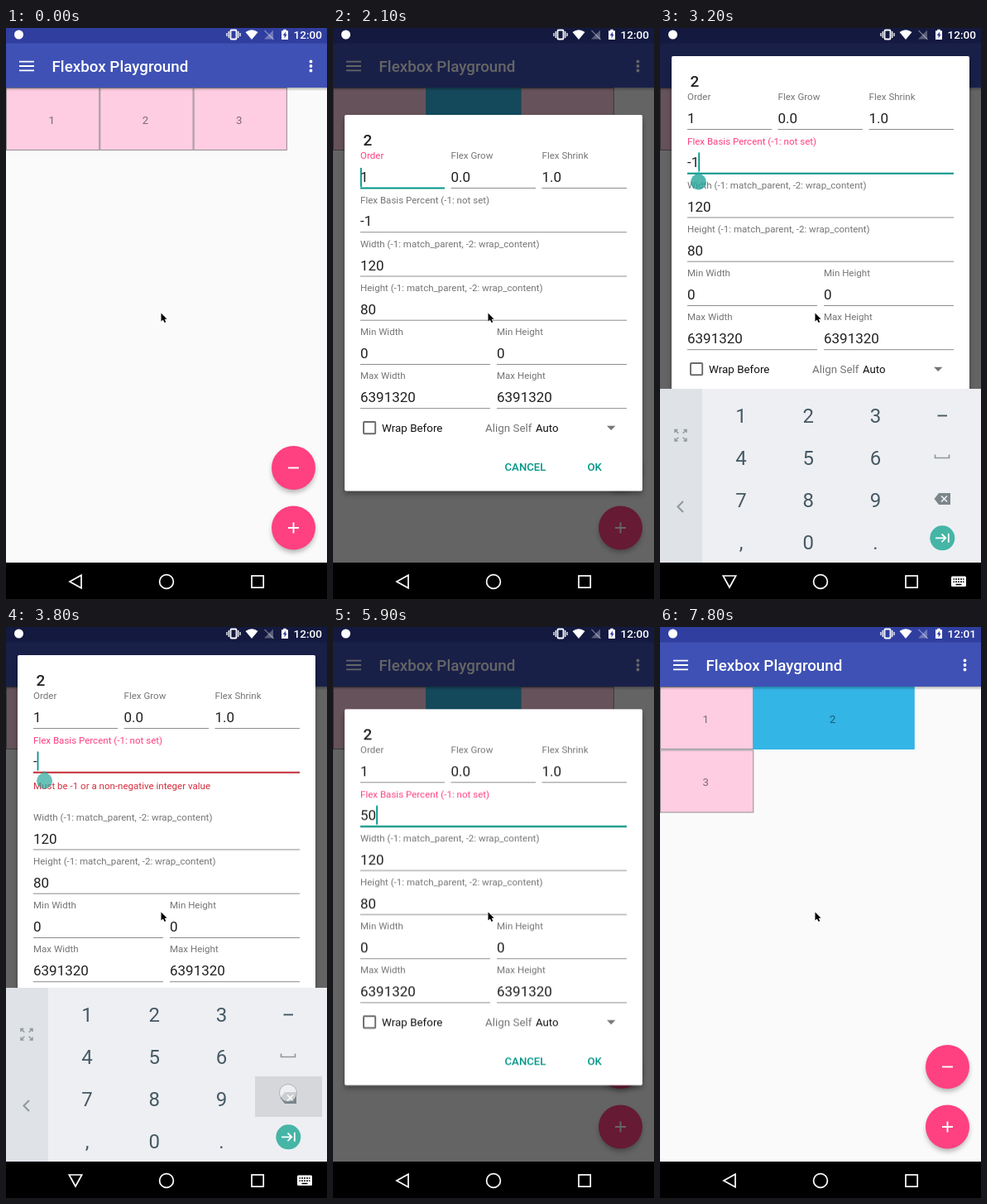
An HTML page for the animation above (8000 ms loop, 388 by 690 pixels).

```html
<!DOCTYPE html>
<html lang="en">
<head>
<meta charset="utf-8">
<title>Flexbox Playground</title>
<style>
html, body { margin: 0; width: 100%; height: 100%; overflow: hidden; background: #fafafa; }
svg { display: block; width: 388px; height: 690px; }
text { font-family: Roboto, sans-serif; white-space: pre; }
</style>
</head>
<body>
<svg id="stage" viewBox="0 0 388 690" xmlns="http://www.w3.org/2000/svg">
  <defs>
    <filter id="soft" x="-30%" y="-30%" width="160%" height="160%"><feGaussianBlur stdDeviation="3"/></filter>
    <linearGradient id="fall" x2="0" y2="1">
      <stop stop-opacity=".28"/><stop offset="1" stop-opacity="0"/>
    </linearGradient>
  </defs>
</svg>
<script>
const LOOP = 8000, TEAL = '#009688', PINK = '#ff4081', GREY = '#757575', INK = '#212121';
const stage = document.getElementById('stage');

function add(parent, tag, attrs = {}, text) {
  const node = document.createElementNS('http://www.w3.org/2000/svg', tag);
  for (const key in attrs) node.setAttribute(key, attrs[key]);
  if (text !== undefined) node.textContent = text;
  parent.append(node);
  return node;
}
const group = (parent, attrs) => add(parent, 'g', attrs);
const rect = (parent, x, y, width, height, fill, more) =>
  add(parent, 'rect', { x, y, width, height, fill, ...more });
const circle = (parent, cx, cy, r, fill, more) => add(parent, 'circle', { cx, cy, r, fill, ...more });
const path = (parent, d, fill, more) => add(parent, 'path', { d, fill, ...more });
const line = (parent, d, stroke, width) => path(parent, d, 'none', { stroke, 'stroke-width': width });
const label = (parent, x, y, text, size, fill, more) =>
  add(parent, 'text', { x, y, 'font-size': size, fill, ...more }, text);
const BOLD = { 'font-weight': 500 }, MID = { 'text-anchor': 'middle' };

// Steps are [ms, value]; the first and last values fill the rest of the loop.
function track(node, prop, steps, easing = 'linear') {
  const all = [...steps];
  if (all[0][0] > 0) all.unshift([0, all[0][1]]);
  if (all.at(-1)[0] < LOOP) all.push([LOOP, all.at(-1)[1]]);
  node.animate(all.map(([ms, value]) => ({ offset: ms / LOOP, [prop]: value, easing })),
    { duration: LOOP, iterations: Infinity });
  return node;
}
const fade = (node, ...steps) => track(node, 'opacity', steps);
const slide = (node, ...steps) =>
  track(node, 'transform', steps.map(([ms, y]) => [ms, `translateY(${y}px)`]));
const hold = (node, prop, ...steps) => track(node, prop, steps, 'steps(1, end)');

// Visible only inside the given [from, to] spans.
function show(node, ...spans) {
  const steps = spans.flatMap(([from, to]) => [[from, 1], [to, 0]]);
  if (steps[0][0] > 0) steps.unshift([0, 0]);
  return hold(node, 'opacity', ...steps);
}

// Page
rect(stage, 0, 0, 388, 690, '#fafafa');
const page = group(stage);

function item(parent, n, x, y, w, blue) {
  const g = group(parent);
  if (blue) rect(g, x - 1, y, w + 1.5, 76, '#33b5e5');
  else rect(g, x + .5, y + .5, w - 1, 75, '#ffcde1', { stroke: '#929092' });
  label(g, x + w / 2 - 1.5, y + 43.5, n, 13.2, 'rgba(0,0,0,.5)', MID);
  return g;
}
const W = 113.3, RELAYOUT = 6560;
item(page, 1, 0, 72, W);
show(item(page, 3, 2 * W, 72, W), [0, RELAYOUT]);
show(item(page, 2, W, 72, W), [0, 960]);
show(item(page, 2, W, 72, W, true), [960, RELAYOUT]);
show(item(page, 2, W, 72, 194, true), [RELAYOUT, LOOP]);
show(item(page, 3, 0, 148.5, W), [RELAYOUT, LOOP]);

rect(page, 0, 0, 388, 72, '#3f51b5');
rect(page, 0, 0, 388, 18.5, '#303f9f');
rect(page, 0, 72, 388, 4, 'url(#fall)');
line(page, 'M16 40.6H34M16 46H34M16 51.4H34', '#fff', 1.9);
label(page, 55.5, 53, 'Flexbox Playground', 18.8, '#fff', BOLD);
for (const y of [40.5, 46, 51.5]) circle(page, 368.5, y, 1.9, '#fff');

for (const [y, icon] of [[531.5, 'M341 531.5h13'], [604, 'M341 604h13M347.5 597.5v13']]) {
  circle(page, 347.5, y + 4, 25.5, '#000', { opacity: .3, filter: 'url(#soft)' });
  circle(page, 347.5, y, 26.5, PINK);
  line(page, icon, '#fff', 1.9);
}

const scrim = rect(stage, 0, 0, 388, 646, '#000');
fade(scrim, [1100, 0], [1200, .27], [1400, .6], [6500, .6], [6600, .47], [6700, .25], [6900, 0]);

// Status bar
const status = group(stage);
circle(status, 15.5, 8, 5.5, '#fff');
rect(status, 271.5, 2.5, 7, 11, 'none', { stroke: '#fff', 'stroke-width': 1.8, rx: 1 });
line(status, 'M269.3 4v8M280.7 4v8M267 6v4M283 6v4', '#fff', 1.3);
path(status, 'M289.5 5Q297 -.5 304.5 5L297 14Z', '#fff');
path(status, 'M323 2.5V13.5H312Z', '#fff', { opacity: .3 });
line(status, 'M312.5 3L323.5 14', 'rgba(255,255,255,.4)', 1.2);
path(status, 'M333 3.2h2.2v-1.5h3.6v1.5H341V14h-8Z', '#fff');
path(status, 'M338 4.6l-3.2 4.4h1.8v3.4l3-4.6h-1.6Z', '#303f9f');
const clock = { 'text-anchor': 'end', ...BOLD };
show(label(status, 382, 13, '12:00', 13.6, '#fff', clock), [0, 7200]);
show(label(status, 382, 13, '12:01', 13.6, '#fff', clock), [7200, LOOP]);

// Dialog
const dialog = group(stage);
fade(dialog, [1100, 0], [1200, .94], [1300, 1], [6500, 1], [6600, .42], [6700, .1], [6780, 0]);
const body = group(dialog);
slide(body, [2980, 0], [3060, -40], [3180, -71], [5700, -71], [5800, -36], [5920, 0]);
rect(body, 14, 110, 360, 453, '#000', { opacity: .35, filter: 'url(#soft)' });
rect(body, 14, 105, 360, 454.5, '#fff', { rx: 2 });
label(body, 36.5, 142, '2', 18.9, INK, BOLD);

const FOCUS = 2580, ERROR = [3620, 4520];
const lower = group(body);
hold(lower, 'transform', [0, 'translateY(0)'], [ERROR[0], 'translateY(40px)'], [ERROR[1], 'translateY(0)']);

function field(parent, x, right, y, name, value) {
  line(parent, `M${x} ${y + 35.3}H${right}`, '#8c8c8c', 1);
  if (value) label(parent, x, y + 28, value, 17, INK);
  return label(parent, x, y, name, 11.55, GREY);
}
const order = field(body, 33, 135, 158.2, 'Order', '1');
field(body, 142.5, 245, 158.2, 'Flex Grow', '0.0');
field(body, 252.5, 355, 158.2, 'Flex Shrink', '1.0');
const basis = field(body, 33, 355, 211.5, 'Flex Basis Percent (-1: not set)');
field(lower, 33, 355, 264.7, 'Width (-1: match_parent, -2: wrap_content)', '120');
field(lower, 33, 355, 317.9, 'Height (-1: match_parent, -2: wrap_content)', '80');
field(lower, 33, 190, 371.2, 'Min Width', '0');
field(lower, 198, 355, 371.2, 'Min Height', '0');
field(lower, 33, 190, 424.4, 'Max Width', '6391320');
field(lower, 198, 355, 424.4, 'Max Height', '6391320');

hold(order, 'fill', [0, PINK], [FOCUS, GREY]);
hold(basis, 'fill', [0, GREY], [FOCUS, PINK]);
show(line(body, 'M33 193.5H135', TEAL, 2), [0, FOCUS]);
show(line(body, 'M33 246.8H355', TEAL, 2), [FOCUS, ERROR[0]], [ERROR[1], LOOP]);
show(line(body, 'M33 246.8H355', '#c62f38', 2), ERROR);
fade(label(body, 33, 266.5, 'Must be -1 or a non-negative integer value', 11.55, '#d32f3f'),
  [ERROR[0], 0], [3760, 1], [ERROR[1] - 20, 1], [ERROR[1], 0]);

const typed = [['-1', 0, 3580], ['-', 3580, 3960], ['5', 4480, 4800], ['50', 4800, LOOP]];
for (const [text, from, to] of typed) show(label(body, 33, 239.3, text, 17, INK), [from, to]);

const caret = (x, y, ...spans) => show(rect(body, x, y, 1.8, 23, TEAL), ...spans);
caret(33, 169, [1150, 1600], [2100, FOCUS]);
caret(46.3, 221.5, [FOCUS, 3260], [3380, 3580]);
caret(37.6, 221.5, [3580, 3960]);
caret(33, 221.5, [3960, 4480]);
caret(42.5, 221.5, [4480, 4800]);
caret(52.2, 221.5, [4800, 5280], [5780, 6180]);

const handle = path(body, 'M46.5 245L53.5 250.5A9.5 9.5 0 1 1 39.5 250.5Z', '#26a69a');
fade(handle, [2680, 0], [2800, .8], [3580, .8], [3800, .7], [4000, 0]);

rect(lower, 37, 476, 14.2, 14.2, 'none', { stroke: '#6b6b6b', 'stroke-width': 1.9, rx: 1 });
label(lower, 59, 488, 'Wrap Before', 13.4, '#111');
label(lower, 184, 488, 'Align Self', 13.4, GREY);
label(lower, 245, 488, 'Auto', 13.2, '#111');
path(lower, 'M331 480.8h10.4l-5.2 5.2Z', '#757575');
label(lower, 207.5, 534.5, 'CANCEL', 13.2, TEAL, BOLD);
label(lower, 307.5, 534.5, 'OK', 13.2, TEAL, BOLD);

// Keyboard
rect(stage, 0, 646, 388, 44, '#000');
const board = group(stage), KEY = '#455a64', SOFT = '#90989c';
slide(board, [2800, 140], [2900, 67], [3000, 16], [3100, 0], [5600, 0], [5700, 50], [5820, 130]);
fade(board, [2820, 0], [2900, .53], [3000, .9], [3080, 1], [5600, 1], [5700, .6], [5800, 0]);
rect(board, 0, 436, 388, 210, '#eeeff3');
rect(board, 0, 436, 51, 210, '#dfe2e6');
show(rect(board, 301, 543, 81, 49, '#d6d7db'), [3480, 3580], [3740, 3960]);
show(rect(board, 139, 492, 81, 50, '#d6d7db'), [4400, 4560]);
[['1', '2', '3'], ['4', '5', '6'], ['7', '8', '9'], [',', '0', '.']].forEach((row, r) =>
  row.forEach((key, c) => label(board, 98 + c * 81.2, 476.5 + r * 51.2, key, 24, KEY, MID)));
line(board, 'M335.5 468.5h11.5', KEY, 1.9);
line(board, 'M332.5 515.5v4h17v-4', SOFT, 1.7);
path(board, 'M331.5 569l5.5-7h14v14h-14Z', '#7b868b');
line(board, 'M340 565.5l7 7M347 565.5l-7 7', '#eeeff3', 1.7);
circle(board, 341.3, 616.3, 15, '#45b5a6');
line(board, 'M333 616.3h12M340.5 611.5l4.8 4.8l-4.8 4.8M348.8 610.8v11', '#fff', 1.8);
line(board, 'M18 489v-3.5h3.5M18 485.5l4.3 4.3M28.5 485.5H32v3.5M32 485.5l-4.3 4.3'
  + 'M18 495.5v3.5h3.5M18 499l4.3-4.3M28.5 499H32v-3.5M32 499l-4.3-4.3', SOFT, 1.4);
line(board, 'M28 572l-6.5 6.5l6.5 6.5', SOFT, 2);

// Navigation bar, black again once the keyboard has settled
const shade = rect(stage, 0, 646, 388, 44, '#000');
fade(shade, [2800, 1], [2900, .32], [3100, 1]);
const nav = group(stage), KEYS = [2850, 5650];
show(line(nav, 'M77 669L91 661.3V676.7Z', '#fff', 1.7), [0, KEYS[0]], [KEYS[1], LOOP]);
const typing = show(group(nav), KEYS);
line(typing, 'M76.3 662H91.7L84 676Z', '#fff', 1.7);
rect(typing, 352, 662.5, 18, 12.5, '#fff', { rx: 1.5 });
line(typing, 'M354.5 666h13M354.5 669.2h13', '#000', 1.6);
for (let x = 356.5; x < 367; x += 3) line(typing, `M${x} 664.5v5.5`, '#fff', 1);
line(typing, 'M357.5 672.5h7', '#000', 1.5);
circle(nav, 194, 669, 8.4, 'none', { stroke: '#fff', 'stroke-width': 1.7 });
rect(nav, 297, 662, 14.2, 14.2, 'none', { stroke: '#fff', 'stroke-width': 1.7 });

// Taps
function tap(x, y, from, to) {
  const dot = circle(stage, x, y, 10.5, 'rgba(255,255,255,.6)', { stroke: 'rgba(110,110,130,.4)' });
  fade(dot, [from - 30, 0], [from, 1], [to - 80, 1], [to, 0]);
}
tap(170, 112, 800, 1060);
fade(circle(stage, 162.5, 227.5, 10.5, 'none', { stroke: '#c9c9c9' }),
  [2470, 0], [2500, 1], [2900, .7], [3000, 0]);
tap(341, 573, 3430, 3640);
tap(341, 563, 3730, 3980);
tap(180, 520, 4370, 4600);
tap(180, 603, 4700, 4950);
tap(84, 668, 5450, 5750);
tap(328, 523, 6480, 6740);

// Pointer
path(stage, 'M187.5 344.5v10l2.3-2l1.8 3.6l1.7-.8l-1.7-3.5h3Z', '#000',
  { stroke: '#fff', 'stroke-width': 1, 'paint-order': 'stroke' });
</script>
</body>
</html>
```
